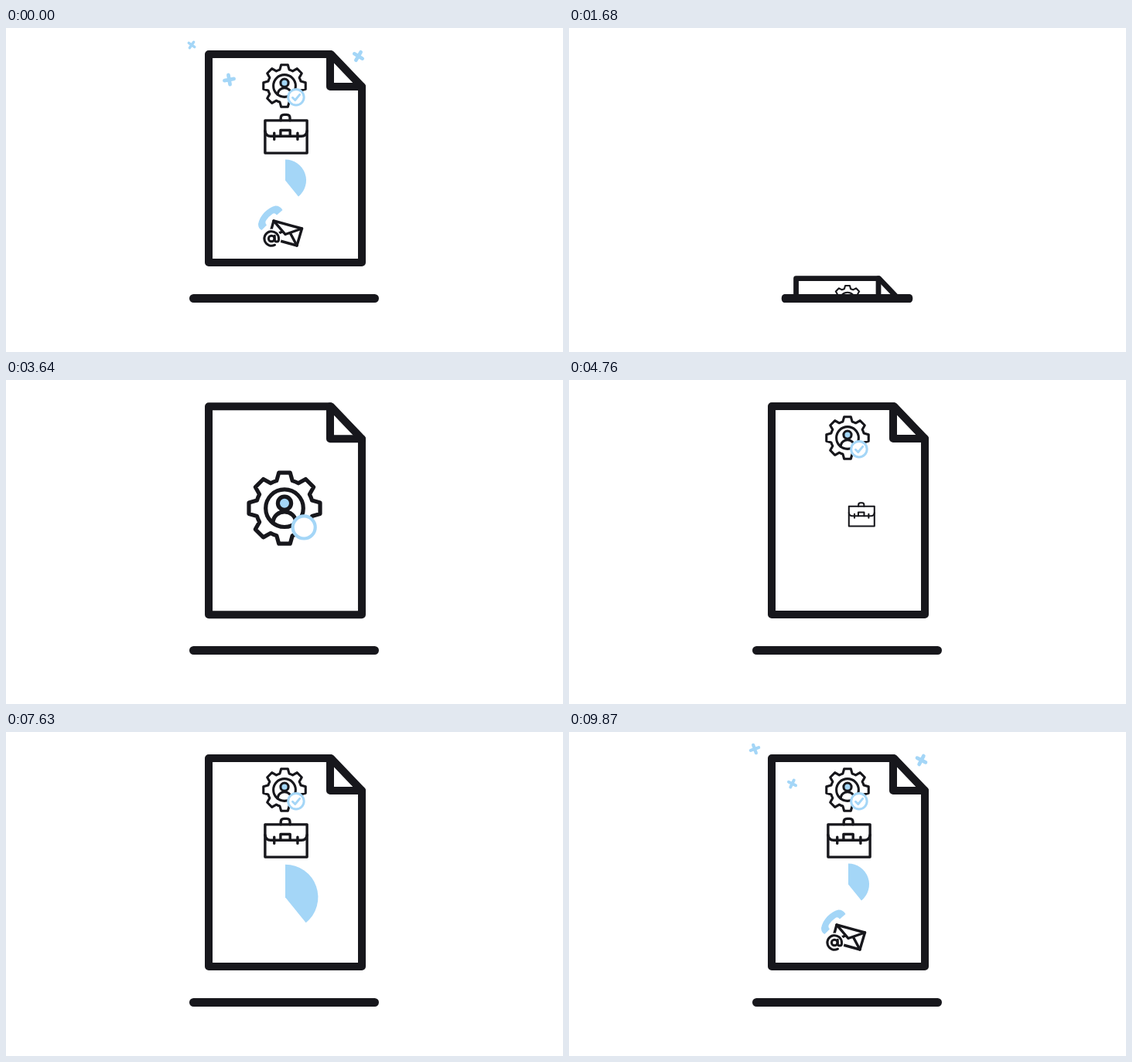
An HTML page for the animation above (9.94 s loop, 720 by 420 pixels).

```html
<!DOCTYPE html>
<html lang="en">
<head>
<meta charset="utf-8">
<title>Profile document</title>
<style>
  html, body { margin: 0; width: 100%; height: 100%; overflow: hidden; background: #fff; }
  svg { display: block; width: 100vw; height: 100vh; }
  .ink { fill: none; stroke: #17171c; stroke-linecap: round; stroke-linejoin: round; }
  .sky { fill: none; stroke: #a4d6f7; stroke-linecap: round; stroke-linejoin: round; }
</style>
</head>
<body>
<svg viewBox="0 0 720 420">
  <defs><clipPath id="above"><rect width="720" height="350"/></clipPath></defs>
  <g clip-path="url(#above)">
    <g id="doc">
      <path class="ink" stroke-width="10" style="fill:#fff" d="M262 34H420L460 76V304H262Z"/>
      <path class="ink" stroke-width="10" d="M419 34V76H460"/>

      <g id="gear" class="ink" stroke-width="5.2">
        <path id="cog"/>
        <circle r="24.3"/>
        <path d="M-15 19C-14 0 14 0 15 19"/>
        <circle cy="-6.5" r="8.6" style="fill:#a4d6f7"/>
        <g id="badge" class="sky" stroke-width="5">
          <circle r="17.3" style="fill:#fff"/>
          <path id="check" pathLength="1" stroke-dasharray="1 2" d="M-7.5 1L-2 6.5L8 -5.5"/>
        </g>
      </g>

      <g id="work">
        <g id="bag" class="ink" stroke-width="5.7">
          <path d="M-45.8 -29H45.8V42.4H-45.8Z"/>
          <path d="M-11.5 -29V-34Q-11.5 -41.5 -4.5 -41.5H1.5Q8.5 -41.5 8.5 -34V-29"/>
          <path d="M-45.8 -6Q-44 5.4 -34 5.4H34Q44 5.4 45.8 -6"/>
          <path d="M-12 5.4V-7.5H8.8V5.4M-25.8 -1.5V12.5M25.2 -1.5V12.5"/>
        </g>
        <g id="arrows" class="sky" stroke-width="6"></g>
      </g>

      <path id="pie" fill="#a4d6f7"/>

      <g id="contact">
        <g id="mail" class="ink" stroke-width="3.4">
          <path d="M346 250L382.5 260L376 282L340 272Z"/>
          <path d="M346 250L361 267.5L382.5 260M376 282L367.5 266M340 272L357 264"/>
        </g>
        <g id="at" class="ink" stroke-width="3">
          <circle cx="343.2" cy="273" r="12.5" style="fill:#fff;stroke:none"/>
          <circle cx="343.2" cy="273" r="3.8"/>
          <path d="M347.3 269.3V274.5A2.6 2.6 0 0 0 352.5 274.5V273A9.3 9.3 0 1 0 347.5 281.2"/>
        </g>
        <path id="phone" fill="#a4d6f7" d="M357.5 236Q354 230 348 230.5C338 233 328 243 326 254Q326 260 330.5 262L337 255.5Q334 252.5 336.5 249Q340 244 344.5 241Q347 239 350 242.5Z"/>
      </g>
    </g>
  </g>
  <rect id="line" x="237" y="345" width="245" height="11" rx="5.5" fill="#17171c"/>
  <g id="sparks" class="sky" stroke-width="5"></g>
</svg>
<script>
const LOOP = 9940, STEP = 70, START = 2380, SMALL = 0.592;
const $ = id => document.getElementById(id);
const mix = (a, b, u) => a + (b - a) * u;
const ramp = (t, from, to) => Math.min(1, Math.max(0, (t - from) / (to - from)));
const out = (u, power) => 1 - Math.pow(1 - u, power);

// Puts a part at x, y with scale k; ox, oy is its own pivot.
function place(el, x, y, k, ox = 0, oy = 0, ky = k) {
  el.style.display = k > 0.001 ? "" : "none";
  el.setAttribute("transform", `translate(${x} ${y}) scale(${k} ${ky}) translate(${-ox} ${-oy})`);
}

function addPaths(parent, count, d) {
  return Array.from({ length: count }, () => {
    const p = document.createElementNS("http://www.w3.org/2000/svg", "path");
    p.setAttribute("d", d);
    return parent.appendChild(p);
  });
}

function polar(r, deg) {
  const a = deg * Math.PI / 180;
  return `${(r * Math.sin(a)).toFixed(2)} ${(-r * Math.cos(a)).toFixed(2)}`;
}

function cogPath() {
  let d = "";
  for (let a = 0; a < 360; a += 45) {
    d += `${a ? "A37 37 0 0 1" : "M"}${polar(37, a - 16)}L${polar(46.6, a - 9)}L${polar(46.6, a + 9)}L${polar(37, a + 16)}`;
  }
  return d + `A37 37 0 0 1 ${polar(37, -16)}Z`;
}

$("cog").setAttribute("d", cogPath());
const arrows = addPaths($("arrows"), 3, "M4 -8.3L-4 0L4 8.3");
const sparks = addPaths($("sparks"), 3, "M-6.5 0H6.5M0 -6.5V6.5");
const sparkles = [
  { x: 240, y: 22, from: 9295, to: 10040, size: 1, angle: 35, spin: -0.5 },
  { x: 288.5, y: 67, from: 9780, to: 10360, size: 1.06, angle: -10, spin: -0.52 },
  { x: 455.5, y: 36.5, from: 9560, to: 10220, size: 0.95, angle: 31, spin: 0.05 }
];

function drawPage(t) {
  let s = out(ramp(t, 2400, 3150), 1.45);
  const late = t - 3150;
  if (late > 0) s += 0.0117 * Math.exp(-0.00367 * late) * Math.sin(Math.PI * late / 250);
  s *= 1 - ramp(t, LOOP + 1400, LOOP + 2270);
  place($("doc"), 360, 169 + 768 * (1 - s), s, 360, 169);

  const width = out(ramp(t, 2400, 3000), 3) * (1 - ramp(t, LOOP + 1400, LOOP + 2310));
  place($("line"), 359.5, 0, width, 359.5, 0, 1);
}

function drawGear(t) {
  const u = ramp(t, 4300, 4720);
  place($("gear"), 360, mix(166, 75, u), out(ramp(t, 3130, 3480), 2) * mix(1, SMALL, u));
  place($("badge"), 25.2, 24.8, ramp(t, 3430, 3680));
  const drawn = ramp(t, 3690, 4200);
  $("check").style.display = drawn > 0 ? "" : "none";
  $("check").setAttribute("stroke-dashoffset", 1 - drawn);
}

function drawWork(t) {
  const u = ramp(t, 6020, 6430);
  place($("work"), mix(378.3, 362, u), mix(174.3, 137, u), mix(1, SMALL, u));
  place($("bag"), 0, 0, out(ramp(t, 4690, 5040), 2));
  arrows.forEach((el, i) => {
    const enter = ramp(t, 5170 - i * 70, 5390 - i * 70);
    const leave = ramp(t, 6160 - i * 70, 6300 - i * 70);
    place(el, -89 + i * 14.3, 5.4, enter * (1 - leave));
  });
}

function drawPie(t) {
  const u = ramp(t, 7560, 7965), sweep = 141 * ramp(t, 6430, 6930);
  $("pie").setAttribute("d", `M0 0V-45.6A45.6 45.6 0 0 1 ${polar(45.6, sweep)}Z`);
  place($("pie"), 361, mix(217.7, 197.5, u), sweep ? mix(1, SMALL, u) : 0);
}

function drawContact(t) {
  const u = ramp(t, 9100, 9510);
  place($("contact"), mix(350, 355, u), mix(251.5, 257, u), mix(1 / SMALL, 1, u), 355, 257);
  place($("mail"), 361, 266, out(ramp(t, 7960, 8270), 2), 361, 266);
  place($("at"), 343.2, 273, out(ramp(t, 8190, 8470), 2), 343.2, 273);
  place($("phone"), 341, 246, out(ramp(t, 8400, 8750), 2), 341, 246);
}

function drawSparks(t) {
  sparkles.forEach((p, i) => {
    const u = ramp(t, p.from, p.to);
    const k = p.size * Math.pow(Math.max(0, Math.sin(Math.PI * u)), 0.4);
    sparks[i].style.display = u > 0 && u < 1 ? "" : "none";
    sparks[i].setAttribute("transform",
      `translate(${p.x} ${p.y}) rotate(${p.angle + p.spin * (t - LOOP)}) scale(${k})`);
  });
}

function draw(ms) {
  const now = Math.floor((ms % LOOP) / STEP) * STEP;
  // The story starts with the empty stage and runs across the loop point.
  const t = now < START ? now + LOOP : now;
  [drawPage, drawGear, drawWork, drawPie, drawContact, drawSparks].forEach(part => part(t));
}

const begin = performance.now();
function tick() {
  draw(performance.now() - begin);
  requestAnimationFrame(tick);
}
tick();
</script>
</body>
</html>
```
